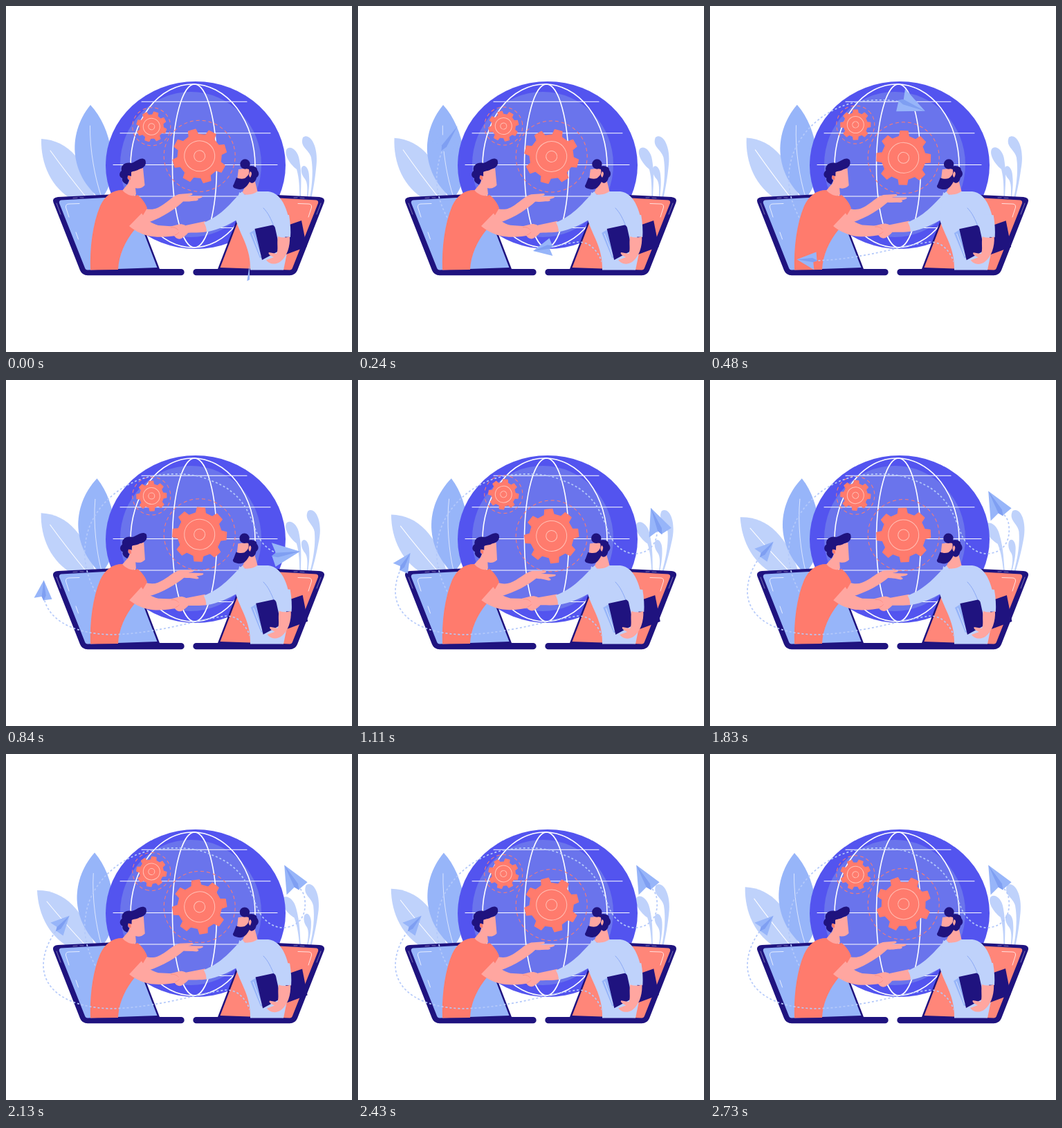
Write an HTML page that moves like this. It is 500x500 px and loops after 2760 ms.

```html
<!DOCTYPE html>
<html lang="en">
<head>
<meta charset="utf-8">
<title>Online partnership</title>
<style>
  html, body { margin: 0; width: 100%; height: 100%; overflow: hidden; background: #fff; }
  svg { display: block; width: 100%; height: 100%; }
  .navy { fill: #1f137f; }
  .coral { fill: #ff7b6d; }
  .skin { fill: #ffa6a0; }
  .pale { fill: #bfd2fb; }
  .blue { fill: #97b5f9; }
  .line { fill: none; stroke: #fff; stroke-linecap: round; }
  .orbit { fill: none; stroke: #ff7b6d; stroke-dasharray: 5 4; }
  .ring { fill: none; stroke: #ffc0b5; }
  .trail { fill: none; stroke: #b4c9fa; stroke-width: 1.7; }
  .fold { fill: #7f9ff2; }
</style>
</head>
<body>
<svg viewBox="0 0 500 500">
  <defs>
    <clipPath id="leftOfPartner"><path d="M0 0H352V500H0Z"/></clipPath>
    <g id="laptop">
      <path class="navy" d="M75 276 L180 271 L222 380 H253 A4.600 4.600 0 0 1 253 389.300 H118 Q110 389 107 382 L68.500 284 Q66 277 75 276Z"/>
      <path d="M80 280.500 L179 275 L218.500 378 L118 381.500 Q115 381.500 114 378.500 L77 285 Q76 281 80 280.500Z"/>
      <path class="line" d="M91 305 L86.500 291 Q86 286 91 286 L106 285.500 M101 327 L104.500 337" stroke-opacity=".75"/>
      <path class="line" d="M73 285 L79 301 M97 277.500 L103 277.200 M107 277 H112" stroke-opacity=".4"/>
    </g>
  </defs>

  <!-- plants -->
  <g id="smallLeaf">
    <path class="pale" d="M51 192 C90 194 117 225 129 280 L98 281 C65 263 50 228 51 192Z"/>
    <path class="line" d="M64 209 C82 234 100 257 118 279"/>
  </g>
  <g id="tallLeaf">
    <path class="blue" d="M122 143 C104 165 97 192 100 216 C104 246 120 265 137 280 C151 262 156 245 152 209 C148 184 138 160 122 143Z"/>
    <path class="line" d="M121.500 173 C121 210 129 250 138 276" stroke-opacity=".65"/>
  </g>
  <g class="pale">
    <path id="tallBud" d="M429 190 C439 182 453 203 448 235 C446 255 443 270 441 278 H439 C443 255 444 236 441 219 C438 207 424 204 429 190Z"/>
    <path id="shortBud" d="M405 208 C409 200 422 207 424 223 C428 245 426 262 426 278 H424.500 C424 262 424 250 420 236 C412 230 402 217 405 208Z"/>
    <path id="lowBud" d="M427 234 C430 227 438 233 438 246 C439 258 437 270 436 278 H434.500 C436 266 436 255 432 250 C428 245 426 240 427 234Z"/>
  </g>

  <!-- globe -->
  <ellipse cx="274" cy="230" rx="130" ry="121" fill="#5354ef"/>
  <ellipse cx="267" cy="229" rx="102" ry="105" fill="#6a74ec"/>
  <g class="line" stroke-width="1.600">
    <ellipse cx="270" cy="231" rx="90" ry="118"/>
    <ellipse cx="272.500" cy="231" rx="32" ry="118"/>
    <path stroke-width="1.100" d="M196 138.300H348 M165 183.700H382 M155 229.500H392 M165 275H382 M196 320.500H350"/>
  </g>

  <!-- gears -->
  <g id="bigGear"></g>
  <g id="smallGear"></g>

  <!-- laptops -->
  <use href="#laptop" fill="#97b5f9"/>
  <use href="#laptop" fill="#ff8679" transform="translate(528 0) scale(-1 1)"/>

  <!-- upper flight, starting behind the left man -->
  <path id="upperTrail" class="trail" d="M150 335 C118 300 110 260 115 235 C120 190 160 150 210 139 C240 134 272 134 295 145 C344 162 352 195 364 225 C374 244 390 254 408 250 C430 245 435 225 431 205 C428 195 418 189 412 178"/>
  <g id="upperPlane">
    <path class="blue" d="M20 0 L-19 -18 L-15 -3 L-21 1 L-18 17Z"/>
    <path class="fold" d="M20 0 L-15 -3 L-22 1 L-13 4Z"/>
  </g>

  <!-- left man -->
  <g id="openArm" class="skin">
    <path d="M198 292 C212 296 218 293 227 287 C236 281 242 274 250 272 L268 270.500 C272 272 268 274 262 275 L283 274.500 C286 276 281 278 275 279 C272 282 264 283 256 282.500 C246 292 228 305 205 313 L188 306Z"/>
    <path id="lowFinger" d="M260 275 L276 278 Q280 280 275 281.500 L260 282Z"/>
  </g>
  <g id="leftHead">
    <path class="skin" d="M181 239 L198 234 L200.500 259 Q195 265 187 263 L188 272 Q180 281 167 268 L177 256Z"/>
    <path class="navy" d="M201 222 C204 229 200 234 192 236 C188 239 184 238 181 240 L181 246 C176 243 173 249 178 252 L175 258 C170 256 167 253 168 249 C163 247 163 241 167 238 C165 230 173 225 181 227 C188 225 195 217 201 222Z"/>
    <path class="coral" d="M176 245 Q181 244 180 251 Q175 252 176 245Z"/>
  </g>
  <path class="coral" d="M122 381.500 C121 350 125 315 136 289 C143 274 154 266 168 266 C175 274 184 276 190 273 C197 278 202 286 204 292 L186 323 C172 340 163 360 162 381Z"/>
  <g id="leftShakeArm" class="skin">
    <path d="M178 318 L196 299.500 C201 308 210 314 220 317 L241 318.500 L250 331 C235 334 218 335 205 332 C194 329 185 324 178 318Z"/>
  </g>

  <!-- lower flight -->
  <g clip-path="url(#leftOfPartner)">
    <path id="lowerTrail" class="trail" d="M357 382 C350 360 340 341 318 341 C280 345 220 367 150 368 C95 366 55 345 54 306 C54 285 64 263 82 244"/>
    <g id="lowerPlane">
      <path class="blue" d="M14 0 L-12 -13 L-10 -2 L-15 1 L-13 13Z"/>
      <path class="fold" d="M14 0 L-10 -2 L-16 1 L-8 4Z"/>
    </g>
  </g>

  <!-- right man -->
  <g id="rightHead">
    <path class="skin" d="M336 236 L352 234 L359 250 L364 270 Q352 278 341 270 L347 258 L334 251Z"/>
    <g class="navy">
      <circle cx="345.500" cy="228.500" r="7.200"/>
      <path d="M343 234 C352 229 364 231 363 237 C367 242 365 246 362 248 C361 255 355 258 352 254 C347 263 342 267 333 264 C328 263 327 260 329 258 L333 248 C337 250 342 250 345 249 C348 247 353 243 351 236Z"/>
    </g>
    <path class="skin" d="M353 239 Q357 241 353 248 Q349 245 353 239Z"/>
  </g>
  <g id="rightShakeArm">
    <path class="skin" d="M260 317 L288 311 L292 326 C281 328 270 327 260 328Z"/>
    <path class="pale" d="M341 268 C326 283 313 302 286 313 Q290 319 290 326.500 C308 323 322 316 335 308 L355 286Z"/>
  </g>
  <path class="pale" d="M337 269 C343 275 357 273 363 268 L379 268 C400 270 411 300 411 333 L401 381.500 H353 C354 350 339 332 332 309Z"/>
  <path class="line" d="M372 292 C379 299 383 308 387 318" style="stroke:#8aa8f5"/>
  <g id="folder">
    <path class="navy" d="M404 318 L427 310 L434.500 348 L402 360Z"/>
    <path class="blue" d="M352 328 L360 323 L374 364 L367 364Z"/>
    <path class="line" d="M356 329 L368 361" stroke-opacity=".6"/>
    <path class="navy" d="M359.500 322 L385 316.500 Q388 317 389 321 L396 353 L370 367Z"/>
    <path class="pale" d="M385 300 L409 302 Q412 320 411 334 L393 333Z"/>
    <path class="skin" d="M393 333 Q402 336 410 333 C411 347 406 362 397 369 C389 375 380 373 376 367 L387 363 C382 361 378 358 380 356 L391 358 C394 352 391 343 393 333Z"/>
  </g>

  <!-- handshake -->
  <g id="handshake">
    <path class="skin" d="M236 319 L248 316 C253 314 262 317 264 321 C266 328 259 332 255 335 C250 339 245 335 243 332 L235 331Z"/>
    <path fill="none" stroke="#ff8b80" stroke-width=".8" d="M238 320 Q245 319 249 324 M244 331 Q248 330 250 327"/>
  </g>
</svg>

<script>
const LOOP = 2760, TAKEOFF = 80, FLIGHT = 1650;
const byId = id => document.getElementById(id);
const move = (id, transform) => byId(id).setAttribute('transform', transform);
const turn = (id, angle, x, y) => move(id, `rotate(${angle} ${x} ${y})`);

// Eight flared teeth, the first one pointing up.
function gearPath(outer, root) {
  const corners = [[-12.5, root], [-8, outer], [8, outer], [12.5, root]];
  const points = [];
  for (let tooth = 0; tooth < 8; tooth++)
    for (const [offset, radius] of corners) {
      const angle = (tooth * 45 + offset - 90) * Math.PI / 180;
      points.push(`${radius * Math.cos(angle)} ${radius * Math.sin(angle)}`);
    }
  return `M${points.join('L')}Z`;
}

function buildGear(id, outer, root, orbit, rings) {
  byId(id).innerHTML = `<circle class="orbit" r="${orbit}"/>
    <path class="coral" stroke="#ff7b6d" stroke-width="1.5" stroke-linejoin="round" d="${gearPath(outer, root)}"/>
    ${rings.map(r => `<circle class="ring" r="${r}"/>`).join('')}`;
}
buildGear('bigGear', 39, 31.5, 51.5, [22, 8]);
buildGear('smallGear', 21.5, 17, 27.5, [12, 4.5]);

function fly(name, progress) {
  const trail = byId(name + 'Trail');
  const total = trail.getTotalLength(), done = total * progress;
  const at = trail.getPointAtLength(done);
  const back = trail.getPointAtLength(Math.max(done - 1, 0));
  const ahead = trail.getPointAtLength(Math.min(done + 1, total));
  const angle = Math.atan2(ahead.y - back.y, ahead.x - back.x) * 180 / Math.PI;
  move(name + 'Plane', `translate(${at.x} ${at.y}) rotate(${angle})`);
  trail.setAttribute('stroke-dasharray', '3 3 '.repeat(Math.floor(done / 6)) + `0 ${total}`);
}

function draw(t) {
  const phase = t / LOOP * 2 * Math.PI;
  const sway = (1 - Math.cos(phase)) / 2;
  const lag = Math.cos(phase - 0.91) - 0.61;
  const spin = t / LOOP * 360;

  turn('tallLeaf', 6 * sway, 137, 278);
  turn('smallLeaf', 2.9 * lag, 125, 285);
  turn('tallBud', 7 * sway, 440, 278);
  turn('shortBud', 3.7 * lag, 425, 278);
  turn('lowBud', -4 * lag, 435, 278);

  move('bigGear', `translate(279.7 ${216.8 + 9.5 * sway}) rotate(${spin - 16.5})`);
  move('smallGear', `translate(210.3 ${174.3 - 10 * sway}) rotate(${17.6 - spin})`);

  turn('leftHead', 3 * sway, 182, 270);
  turn('rightHead', -2 * sway, 353, 268);
  turn('openArm', 5 * sway, 203, 304);
  turn('lowFinger', 12 * sway, 261, 278);
  turn('leftShakeArm', -3 * sway, 186, 312);
  turn('rightShakeArm', 2 * sway, 338, 295);
  move('handshake', `translate(${sway} ${-3.5 * sway})`);
  move('folder', `translate(${2.5 * sway} ${1.2 * sway})`);

  const flown = Math.min(Math.max((t - TAKEOFF) / FLIGHT, 0), 1);
  const progress = 1 - (1 - flown) ** 3;
  fly('upper', progress);
  fly('lower', progress);
}

const start = performance.now();
function tick() {
  draw((performance.now() - start) % LOOP);
  requestAnimationFrame(tick);
}
tick();
</script>
</body>
</html>
```
